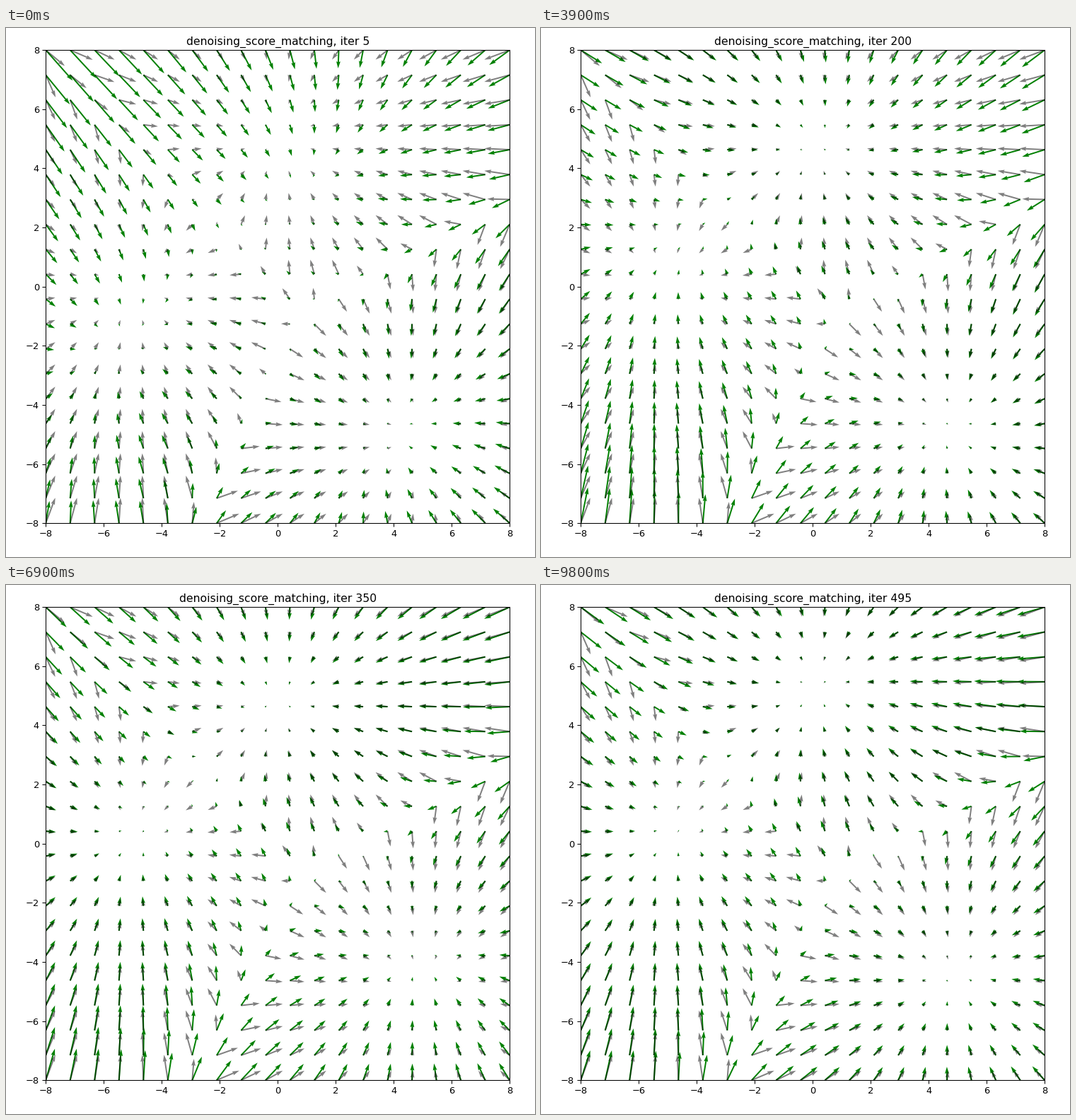
Recreate the animation shown at these times as a matplotlib script. Size 748x748 px, loop 9900 ms.

```python
import numpy as np
import matplotlib.pyplot as plt
from matplotlib.animation import FuncAnimation

SIZE, DPI = 748, 93.5
FRAMES, INTERVAL = 99, 100

CENTERS = np.array([[0, 5], [-5, 0], [5, -5]], float)
axis = np.linspace(-8, 8, 20)
X, Y = np.meshgrid(axis, axis)
GRID = np.stack([X, Y], -1)


def mixture_score(weights, var):
    """Pull towards the Gaussian centers, weighted by responsibility."""
    diff = CENTERS - GRID[..., None, :]
    logits = np.log(weights) - (diff ** 2).sum(-1) / (2 * var)
    resp = np.exp(logits)
    resp /= resp.sum(-1, keepdims=True)
    return np.moveaxis((resp[..., None] * diff).sum(-2), -1, 0)


TRUE_U, TRUE_V = mixture_score([0.3, 0.2, 0.5], 1)
SOFT_U, SOFT_V = mixture_score([0.4, 0.25, 0.35], 8)


def learned_field(it):
    """Smoothed score plus a linear error that drifts during training."""
    shear = np.interp(it, [5, 140, 255, 495], [0.24, 0.17, 0.02, 0.05])
    tilt = np.interp(it, [5, 60, 255, 350], [0.17, -0.26, -0.17, 0.04])
    squash = np.interp(it, [395, 495], [-0.17, 0])
    lift = np.interp(it, [5, 60, 140], [-1.4, 1.9, 0.5])
    return SOFT_U + shear * Y, SOFT_V + tilt * X + squash * Y + lift


fig = plt.figure(figsize=(SIZE / DPI, SIZE / DPI), dpi=DPI)
ax = fig.add_axes([56.2 / SIZE, 47.8 / SIZE, 656 / SIZE, 669 / SIZE])
ax.set(xlim=(-8, 8), ylim=(-8, 8))

learned = ax.quiver(X, Y, *learned_field(5), color="green")
ax.quiver(X, Y, TRUE_U, TRUE_V, color="black", alpha=0.5)
title = ax.set_title("")


def update(frame):
    it = 5 * (frame + 1)
    learned.set_UVC(*learned_field(it))
    learned.scale = None  # rescale to the mean arrow length on each draw
    title.set_text(f"denoising_score_matching, iter {it}")
    return learned, title


anim = FuncAnimation(fig, update, frames=FRAMES, interval=INTERVAL,
                     repeat=True, repeat_delay=0)
plt.show()
```
